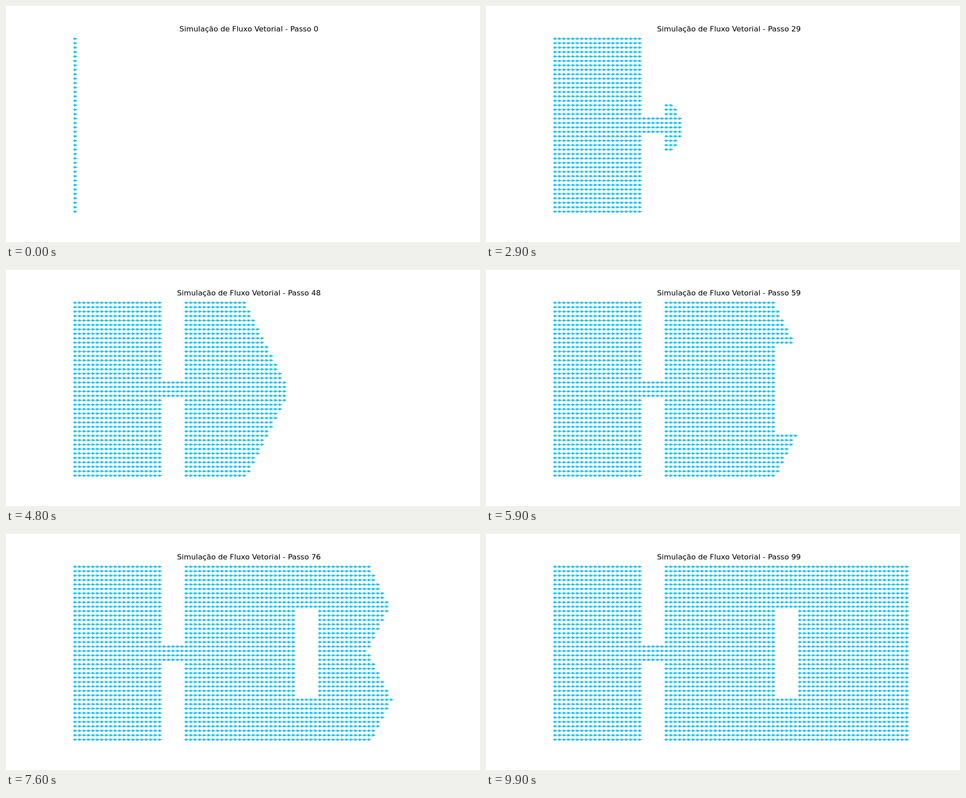
An HTML page with a canvas that plays this animation: 1058x529 px, repeating every 10000 ms.

```html
<!DOCTYPE html>
<html lang="pt">
<head>
<meta charset="utf-8">
<title>Simulação de Fluxo Vetorial</title>
<style>
  html, body { margin: 0; width: 100%; height: 100%; overflow: hidden; background: #fff; }
  canvas { display: block; width: 1058px; height: 529px; }
</style>
</head>
<body>
<canvas id="stage" width="1058" height="529"></canvas>
<script>
const ctx = document.getElementById('stage').getContext('2d');
const W = 1058, H = 529;
const COLS = 80, ROWS = 40, STEPS = 100, STEP_MS = 100;

// Plot area with one cell of margin on each side, equal aspect
const PITCH = H * 0.77 / (ROWS + 1);
const MID_X = W * 0.5125;
const LEFT = MID_X - PITCH * (COLS + 1) / 2 + PITCH;
const TOP = H * 0.12 + PITCH;

const SHAFT = 0.8, BARB = 3.2, HEAD = 8.05, NECK = 7.25;

function isWall(r, c) {
  const slit = c >= 20 && c < 25 && (r < 18 || r > 21);
  const block = c >= 50 && c < 55 && r > 9 && r < 30;
  return slit || block;
}

// Odd rows are shifted half a cell to the right, as in a hexagonal lattice
function neighbours(r, c) {
  const s = r % 2;
  return [[r, c - 1], [r, c + 1],
          [r - 1, c - 1 + s], [r - 1, c + s],
          [r + 1, c - 1 + s], [r + 1, c + s]];
}

// Breadth-first flood from the left edge: arrival time of each cell
function flood() {
  const seen = new Set();
  const cells = [];
  const visit = (r, c, t) => {
    const key = r * COLS + c;
    if (r < 0 || r >= ROWS || c < 0 || c >= COLS || isWall(r, c) || seen.has(key)) return;
    seen.add(key);
    cells.push({ r, c, t });
  };
  for (let r = 0; r < ROWS; r++) visit(r, 0, 0);
  for (let i = 0; i < cells.length; i++) {
    const { r, c, t } = cells[i];
    for (const [nr, nc] of neighbours(r, c)) visit(nr, nc, t + 1);
  }
  return cells;
}

const cells = flood();

function addArrow(x, y) {
  const tip = x + PITCH;
  ctx.moveTo(x, y - SHAFT);
  ctx.lineTo(tip - NECK, y - SHAFT);
  ctx.lineTo(tip - HEAD, y - BARB);
  ctx.lineTo(tip, y);
  ctx.lineTo(tip - HEAD, y + BARB);
  ctx.lineTo(tip - NECK, y + SHAFT);
  ctx.lineTo(x, y + SHAFT);
  ctx.closePath();
}

function draw(step) {
  ctx.fillStyle = '#fff';
  ctx.fillRect(0, 0, W, H);

  ctx.fillStyle = '#000';
  ctx.font = '16.667px "DejaVu Sans", sans-serif';
  ctx.textAlign = 'center';
  ctx.fillText('Simulação de Fluxo Vetorial - Passo ' + step, MID_X, 57);

  ctx.fillStyle = '#00bfff';
  const reach = Math.max(0, step - 1);
  for (const { r, c, t } of cells) {
    if (t > reach) break;
    ctx.beginPath();
    addArrow(LEFT + c * PITCH, TOP + r * PITCH);
    ctx.fill();
  }
}

const start = performance.now();
let shown = -1;

function tick() {
  const elapsed = Math.max(0, performance.now() - start);
  const step = Math.floor(elapsed / STEP_MS) % STEPS;
  if (step !== shown) draw(shown = step);
  requestAnimationFrame(tick);
}
tick();
</script>
</body>
</html>
```
